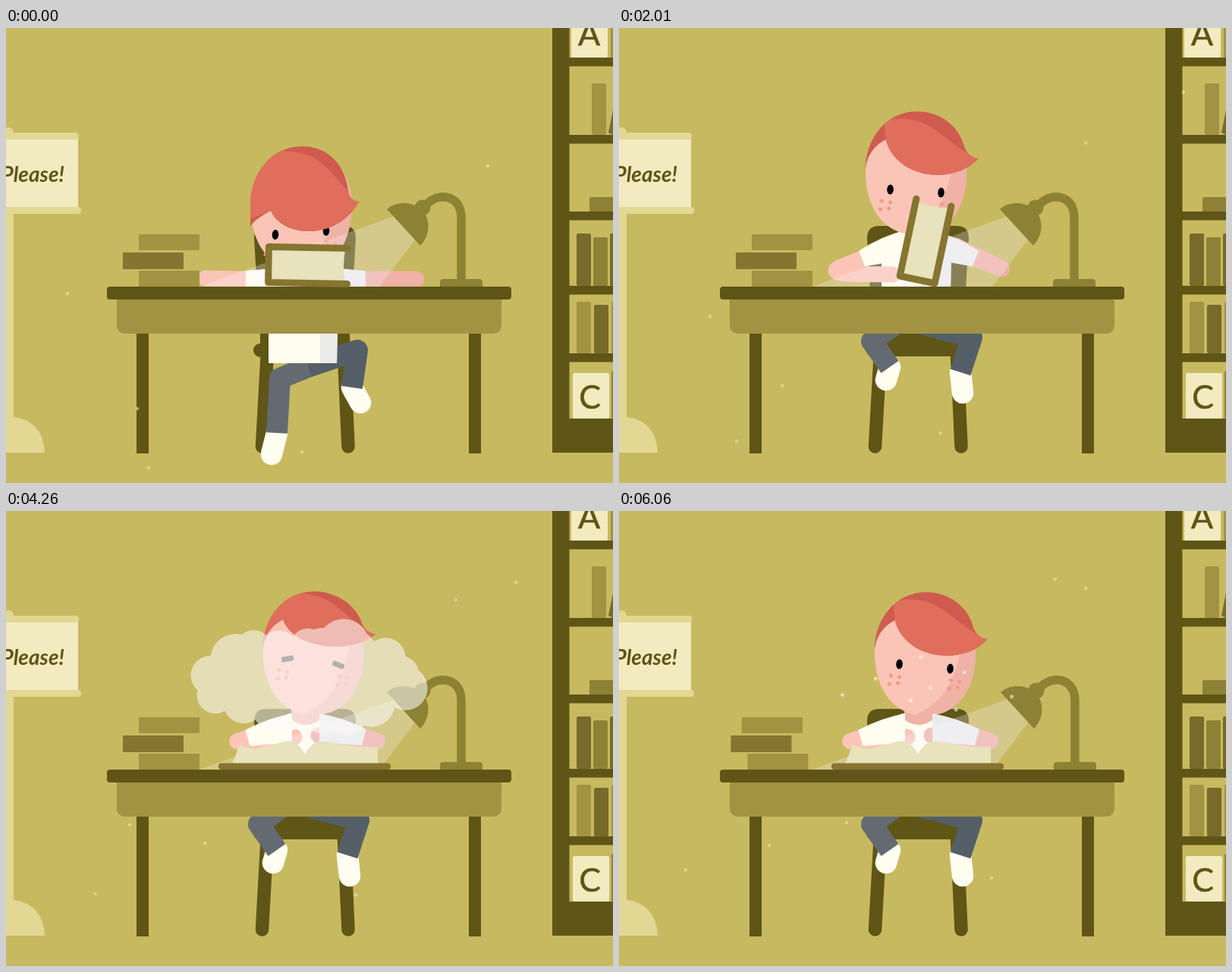
Write an HTML page that moves like this. It is 800 px wide and 600 px high and loops after 6.09 s.

```html
<!DOCTYPE html>
<html lang="en">
<head>
<meta charset="utf-8">
<title>Dusty book</title>
<style>
html, body { margin: 0; width: 100%; height: 100%; overflow: hidden; background: #c7b95f; }
svg { display: block; width: 800px; height: 600px; }
</style>
</head>
<body>
<svg viewBox="0 0 800 600">
  <defs>
    <clipPath id="faceClip"><path id="faceShape" d="M-66.500 -3C-66.500 -48 -38 -81 1 -81C39 -81 66.500 -48 66.500 -3C66.500 50 39 81 1 81C-38 81 -66.500 51 -66.500 -3Z"/></clipPath>
    <clipPath id="torsoClip"><rect x="414" y="200" width="40" height="300"/></clipPath>
  </defs>
  <rect width="800" height="600" fill="#c7b95f"/>
  <g id="sign" fill="#e2d894">
    <rect x="-10" y="240" width="20" height="320"/>
    <path d="M-5 560V513H10Q49 518 51 560Z"/>
    <circle cx="3" cy="138" r="7"/>
    <rect x="-10" y="146" width="105" height="91" fill="#f3ebc0"/>
    <rect x="-10" y="138" width="106" height="9" rx="4"/>
    <rect x="-10" y="236" width="109" height="9" rx="4"/>
    <text x="77" y="203" text-anchor="end" font-family="Lato, 'Open Sans', sans-serif" font-size="28" font-weight="bold" font-style="italic" fill="#5f5516">Please!</text>
  </g>
  <g id="shelf"></g>
  <g id="chair" fill="#5f5516">
    <path d="M327 277Q327 261 343 261H445Q461 261 461 277L457 345H331Z"/>
    <circle cx="335" cy="425" r="9"/>
    <rect x="335" y="400" width="108" height="33"/>
    <path d="M346 400L337.500 552M444 400L451 552" stroke="#5f5516" stroke-width="17.500" stroke-linecap="round"/>
  </g>
  <g id="actor"></g>
  <g id="desk" fill="#5f5516">
    <rect x="172" y="400" width="16" height="161"/>
    <rect x="610" y="400" width="16" height="161"/>
    <path d="M146 355H653V391Q653 403 641 403H158Q146 403 146 391Z" fill="#a29343"/>
    <rect x="133" y="341" width="533" height="17" rx="4"/>
  </g>
  <g id="stack"></g>
  <path d="M512 248L255 341H492L540 278Z" fill="#f7f2ff" opacity=".27"/>
  <g id="lamp" fill="#8d8234">
    <path d="M502 239C512 229 533 228 546 238C560 250 560 272 546 287Z"/>
    <circle cx="549" cy="237" r="10.500"/>
    <path d="M551 238C562 216 600 216 600 250V335" fill="none" stroke="#8d8234" stroke-width="11.500"/>
    <path d="M572 341V335Q572 331 577 331H623Q628 331 628 335V341Z"/>
  </g>
  <g id="book"></g>
  <g id="cloud" fill="#fcfafa" opacity=".56"></g>
  <g id="motes" fill="#eee6c4" opacity=".55"></g>
</svg>
<script>
const LOOP = 6090;
const SKIN = '#fac5b6', SKIN_SHADE = '#f0b1a6', SHIRT = '#fffdf0', SHIRT_SHADE = '#ebebea';
const HAIR = '#e06e5d', HAIR_DARK = '#cf5b4f', COVER = '#857530', PAGE = '#e8e2bd', WOOD = '#5f5516';
const el = id => document.getElementById(id);
const clamp = v => Math.max(0, Math.min(1, v));
const mix = (a, b, k) => a + (b - a) * k;
const mixAll = (a, b, k) => a.map((v, i) => mix(v, b[i], k));
const progress = (t, a, b) => clamp((t - a) / (b - a));
const ease = (t, a, b) => { const k = progress(t, a, b); return k * k * (3 - 2 * k); };
const bump = (t, a, b, c, d) => ease(t, a, b) - ease(t, c, d);
const rect = (x, y, w, h, fill, rx = 0) => `<rect x="${x}" y="${y}" width="${w}" height="${h}" rx="${rx}" fill="${fill}"/>`;
const circle = (x, y, r) => `<circle cx="${x.toFixed(2)}" cy="${y.toFixed(2)}" r="${Math.max(0, r).toFixed(2)}"/>`;
const path = (d, fill, extra = '') => `<path d="${d}" fill="${fill}" ${extra}/>`;
const line = (d, color, width, cap = 'round') =>
  path(d, 'none', `stroke="${color}" stroke-width="${width}" stroke-linecap="${cap}" stroke-linejoin="round"`);

function drawShelf() {
  const pale = '#a29343', mid = '#8d8234', deep = '#776a2a';
  const boards = [39, 141, 242, 340, 429].map(y => rect(740, y, 60, 11.5, WOOD)).join('');
  const letter = (c, x, y) => `<text x="${x}" y="${y}" text-anchor="middle" font-family="Lato, sans-serif" ` +
    `font-size="43" fill="${WOOD}" stroke="${WOOD}" stroke-width=".6">${c}</text>`;
  const book = (x, top, base, fill) => rect(x, top, 19, base - top, fill, 2);
  el('shelf').innerHTML =
    rect(745, -20, 48, 59, '#f3ebc0', 2) + book(797, -5, 39, pale) +
    book(772, 73, 141, pale) + path('M794 138L800 108V141Z', deep) + rect(769, 223, 40, 20, mid, 2) +
    book(752, 271, 340, deep) + book(774, 276, 340, mid) + book(796, 271, 340, deep) +
    book(752, 361, 429, pale) + book(775, 365, 429, deep) + book(798, 361, 429, pale) +
    rect(747, 455, 48, 60, '#f3ebc0', 2) + book(798, 452, 515, mid) +
    boards + rect(720, 0, 22.5, 560, WOOD) + rect(720, 515, 80, 45, WOOD) +
    letter('A', 768.5, 22.5) + letter('C', 769.5, 502);
}

// Each key is held from its first to its second time and eased to the next one.
function track(keys, t) {
  const i = keys.findLastIndex(k => k[0] <= t);
  const [, leave, ...from] = keys[i];
  if (i === keys.length - 1) return from;
  const [arrive, , ...to] = keys[i + 1];
  return mixAll(from, to, ease(t, leave, arrive));
}

// head centre, eye height, eye tilt
const headKeys = [
  [0, 200, 389, 238, 32, -5], [850, 1300, 393.5, 190, 21, -4], [1800, 2500, 391.5, 192, 23, 4],
  [3000, 3500, 406, 219, 25, 6], [3950, 4400, 405, 188, 11, 8], [4900, 5350, 408, 186, 0, 7],
  [5750, LOOP, 403.5, 189, 16, 6]
];
// elbows: left x, right x, y; then left hand, right hand
const armKeys = [
  [0, 200, 310, 490, 331, 263, 330, 541, 331], [850, 1300, 248, 482, 322, 287, 332, 535, 329],
  [1800, 2500, 270, 520, 324, 360, 325, 443, 287], [3000, 3500, 262, 526, 298, 271, 332, 514, 332],
  [3950, LOOP, 296, 500, 306, 380, 298, 412, 296]
];

function moodAt(t) {
  return {
    crouch: 1 - ease(t, 200, 850),
    lift: bump(t, 500, 900, 1300, 1800),
    gust: bump(t, 3500, 4900, 5350, 5750),
    wipe: bump(t, 4400, 4900, 5350, 5750)
  };
}

function arm(side, neck, elbow, hand, skin, shirt) {
  const collar = 395 + side * 18, shoulder = [395 + side * 21, neck + 16];
  const dx = elbow[0] - shoulder[0], dy = elbow[1] - shoulder[1], length = Math.hypot(dx, dy);
  const cuff = mixAll(shoulder, elbow, 58 / length);
  const nx = side * dy / length * 11, ny = -side * dx / length * 11;
  const [ox, oy] = [cuff[0] + nx, cuff[1] + ny];
  const forearm = `M${cuff}L${mixAll(cuff, elbow, 0.5)}Q${elbow} ${mixAll(elbow, hand, 0.5)}L${hand}`;
  const sleeve = `M${collar} ${neck}Q${(collar + ox) / 2} ${mix(neck, oy, 0.25)} ${ox} ${oy}` +
    `L${cuff[0] - nx} ${cuff[1] - ny}L${collar} ${neck + 38}Z`;
  return line(forearm, skin, 21) + path(sleeve, shirt);
}

function leg(hip, knee, ankle, toe, color) {
  return line(`M${ankle}L${toe}`, SHIRT, 28.5) + line(`M398 ${hip}L${knee}L${ankle}`, color, 28, 'butt');
}

function legs(crouch) {
  const pose = (sit, stand) => mixAll(sit, stand, crouch);
  return leg(mix(390, 447, crouch), pose([465, 408], [463, 425]), pose([450, 454], [456, 474]), pose([453, 481], [467, 494]), '#545f68') +
    leg(mix(366, 447, crouch), pose([333, 413], [361, 462]), pose([357, 447], [357, 534]), pose([352, 464], [350, 562]), '#646b70');
}

function torso(neck, bottom) {
  const d = `M346 ${bottom}V${neck + 28}Q350 ${neck + 8} 374 ${neck}H414Q434 ${neck + 6} 438 ${neck + 26}L436 ${bottom}Z`;
  return path(d, SHIRT) + path(d, SHIRT_SHADE, 'clip-path="url(#torsoClip)"') +
    path(`M376 ${neck - 25}H414V${neck + 8}Q395 ${neck + 22} 376 ${neck + 8}Z`, SKIN_SHADE);
}

function eye(x, y, side, t, gust) {
  const at = `transform="translate(${x} ${y}) `;
  if (t > 2700 && t < 3700) return path('M-4 -1Q0 4.500 4 -1', 'none', `${at}" stroke="#000" stroke-width="3"`);
  if (t >= 3700 && t < 5550) {
    const h = mix(10, 5, gust);
    return `<g ${at}rotate(${6 + side * 16})">${rect(-8, -h / 2, 16, h, '#55554f', 2)}${gust > 0.8 ? rect(-1, -2, 8, 4, '#000') : ''}</g>`;
  }
  return `<ellipse rx="4.300" ry="6.500" ${at}rotate(3)"/>`;
}

function freckles(x, y, side) {
  return [[6, 17], [-5, 15], [4, 25], [-7, 26]].map(([dx, dy]) => circle(x + dx + side * 6, y + dy, 2.5)).join('');
}

function head([cx, cy, look, tilt], { crouch, lift, gust }, t) {
  const low = 4 + 29 * crouch - 24 * gust;
  const sweep = Math.max(gust, 0.35 * crouch);
  const tx = 82 - 12 * lift - 6 * crouch, ty = -20 - 24 * lift - 10 * gust + 11 * crouch;
  const hx = -40, hy = -45 + 48 * crouch, side = -6 + 30 * crouch;
  const cap = `M-67 ${side}V-3C-67 -48 -38 -82 1 -82C30 -82 57 -64 ${Math.min(64, tx - 14)} ${ty - 14}` +
    `Q${tx - 12} ${ty - 1} ${tx} ${ty}C${tx - 28} ${low + 10} ${hx + 15} ${low + 6} ${hx} ${hy}Q${hx - 23} ${hy + 12} -67 ${side}Z`;
  const ridge = mixAll([-42, -70], [24, -84], sweep), spread = clamp(sweep * 3);
  const light = `M${mixAll([hx, hy], [-110, 30], spread)}L${mixAll(ridge, [-110, -100], spread)}L${ridge}` +
    `C${mixAll([20, -83], [45, -62], sweep)} ${mixAll([32, -42], [50, -45], sweep)} ${tx} ${ty}L90 60H-48L${hx} ${hy}Z`;
  const left = [-34, look - tilt / 2], right = [33, look + tilt / 2];
  return `<clipPath id="hairClip"><path d="${cap}"/></clipPath><g transform="translate(${cx} ${cy})">` +
    `<use href="#faceShape" fill="${SKIN}"/>` +
    `<g clip-path="url(#faceClip)">${path('M47 -82Q62 52 -18 82H70V-82Z', SKIN_SHADE)}</g>` +
    `<g fill="#f29a85">${freckles(...left, -1)}${freckles(...right, 1)}</g>` +
    eye(...left, -1, t, gust) + eye(...right, 1, t, gust) +
    path(cap, HAIR_DARK) + path(light, HAIR, 'clip-path="url(#hairClip"') + '</g>';
}

function drawActor(t) {
  const mood = moodAt(t), { crouch, wipe } = mood;
  const neck = 267 + 49 * crouch;
  const [leftX, rightX, y, lx, ly, rx, ry] = track(armKeys, t);
  const rightHand = mixAll([rx, ry], [428, 260], wipe);
  el('actor').innerHTML = legs(crouch) + torso(neck, 400 + 42 * crouch) +
    arm(-1, neck, [leftX, y], [lx, ly], SKIN, SHIRT) +
    head(track(headKeys, t), mood, t) +
    arm(1, neck, [rightX, y - 18 * wipe], rightHand, SKIN_SHADE, SHIRT_SHADE);
}

function drawBook(t) {
  if (t < 2750) {
    const lean = ease(t, 1300, 1800);
    el('book').innerHTML = `<g transform="translate(${398 + 6 * lean} ${313 - 32 * lean}) rotate(${1 - 79 * lean})">` +
      path('M-50 -23H49Q45 0 49 23H-50Z', PAGE) +
      line('M52 -23.500H-52V23.500H52', COVER, 9) + '</g>';
    return;
  }
  const k = ease(t, 2750, 2950);
  el('book').innerHTML = `<g transform="translate(394 ${28 * k - 28}) scale(${mix(0.25, 1, k)} 1) translate(-394 0)">` +
    path('M298 334L308 308C335 322 355 303 376 303Q387 307 394 321Q402 305 414 304C438 304 445 312 490 311V334Z', PAGE) +
    rect(280, 332.5, 227, 8.5, COVER, 4) + '</g>';
}

function drawStack(t) {
  const nudge = ease(t, 5980, 6075);
  el('stack').innerHTML = rect(175 - 14 * nudge, 272, 80, 21, '#a29343', 1) +
    rect(154 - 7 * nudge, 296, 80, 22, COVER, 1) + rect(175 - 6 * nudge, 320, 80, 21, '#a29343', 1);
  el('lamp').setAttribute('transform', `translate(${nudge} 0)`);
}

let seed = 11;
const random = () => (seed = seed * 16807 % 2147483647) / 2147483647;
const PUFFS = 46;
const puffs = Array.from({ length: PUFFS }, (_, i) => {
  const angle = i * 2.4, reach = Math.sqrt((i + 0.5) / PUFFS);
  return {
    x: 148 * reach * Math.cos(angle), y: 52 * reach * Math.sin(angle),
    full: 24 + 12 * random(), small: 3 + 15 * random() ** 2, last: i % 6 ? 0 : 2.5
  };
});

// The dust bursts out, hangs as one cloud, breaks into puffs and settles.
function drawCloud(t) {
  const burst = 1 - (1 - progress(t, 2900, 3400)) ** 3;
  const scale = burst * (1 - 0.12 * progress(t, 3450, 5190));
  const thin = 0.1 * progress(t, 3450, 4260) + 0.9 * ease(t, 4260, 5190);
  const settle = progress(t, 5190, 5950);
  el('cloud').innerHTML = burst ? puffs.map(p => circle(
    397 + p.x * scale, mix(318, 221, burst) + p.y * scale + 12 * settle,
    mix(mix(p.full, p.small, thin), p.last, settle) * burst)).join('') : '';
}

// start position and drift over one loop
const motes = [
  [81, 350, 117, 91], [173, 502, 127, -91], [635, 182, -60, -92],
  [188, 580, -100, -107], [390, 559, 101, -75], [808, 76, -193, 26]
];

function drawMotes(t) {
  el('motes').innerHTML = motes.map(([x, y, dx, dy]) => circle(x + dx * t / 6060, y + dy * t / 6060, 2.3)).join('');
}

function render(t) {
  for (const draw of [drawActor, drawBook, drawStack, drawCloud, drawMotes]) draw(t);
}

drawShelf();
const start = performance.now();
function tick() {
  render((performance.now() - start) % LOOP);
  requestAnimationFrame(tick);
}
tick();
</script>
</body>
</html>
```
